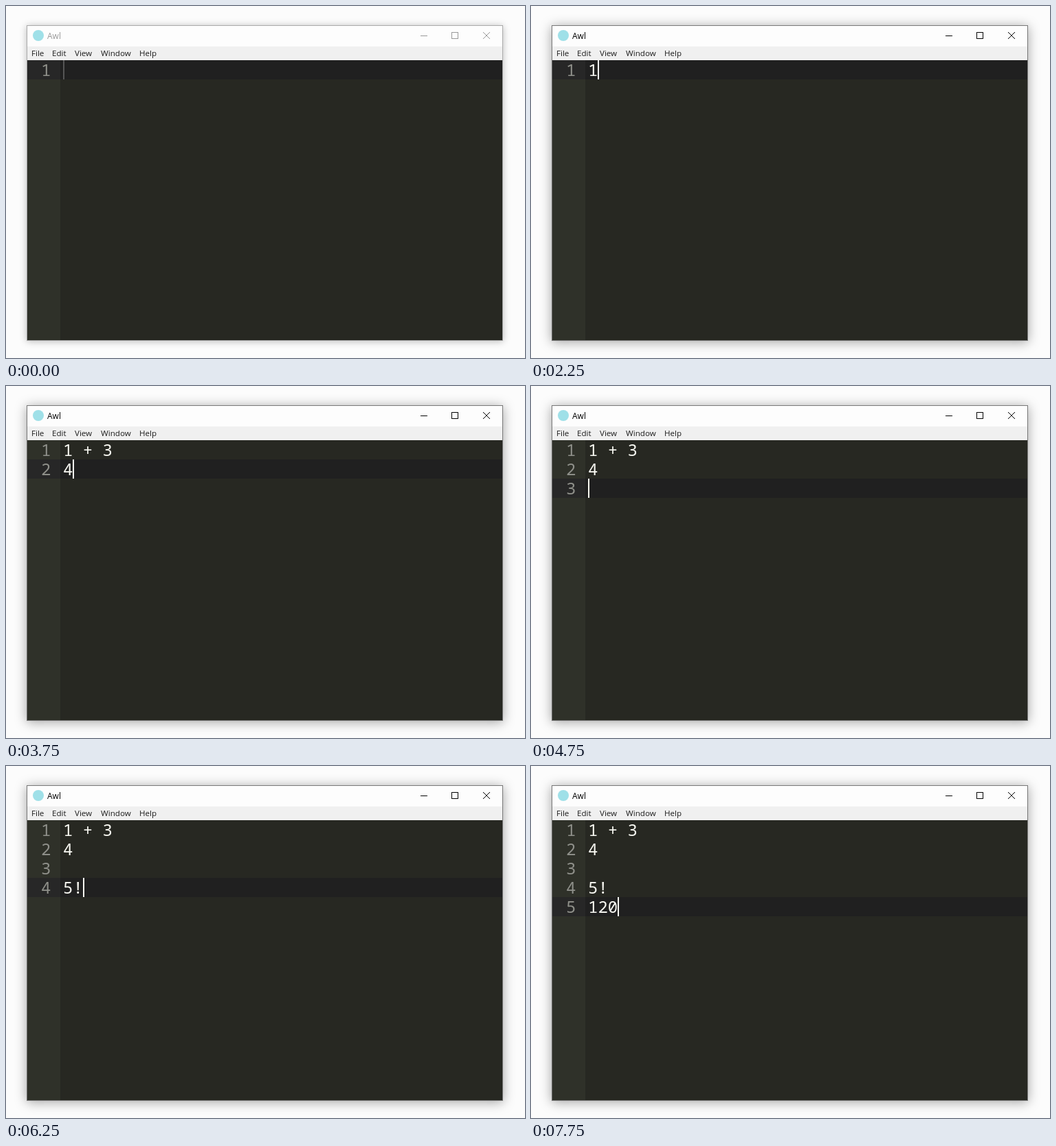
An HTML page with a canvas that plays this animation: 755 px wide and 513 px high, repeating every 8 s.

```html
<!DOCTYPE html>
<html lang="en">
<head>
<meta charset="utf-8">
<title>Calculator editor</title>
<style>
  html, body { margin: 0; width: 100%; height: 100%; overflow: hidden; background: #fcfcfc; }
  canvas { display: block; }
</style>
</head>
<body>
<canvas id="stage" width="755" height="513"></canvas>
<script>
const ctx = document.getElementById('stage').getContext('2d');
const LOOP = 8000;
const FOCUS_AT = 1000;
const WIN = { x: 30, y: 28, w: 693, h: 460 };
const ROW = 28, CELL = 14.4, TOP = 79, TEXT_X = 83, NUMBER_X = 51;
const UI_FONT = '"Open Sans", sans-serif';
const CODE_FONT = '24px "Noto Sans Mono", monospace';

// [start, editor text]
const typing = [
  [0, ''], [2250, '1'], [2500, '1 '], [2750, '1 +'], [3000, '1 + 3'],
  [3750, '1 + 3\n4'], [4750, '1 + 3\n4\n'], [5000, '1 + 3\n4\n\n'],
  [5500, '1 + 3\n4\n\n5'], [6250, '1 + 3\n4\n\n5!'], [6750, '1 + 3\n4\n\n5!\n120']
];
// [start, x, y]; no position means hidden
const pointer = [[0], [500, 178, 409], [750, 173, 203], [1000, 156, 125], [1250, 128, 157], [1500]];
const blinkOff = [1750, 4250, 7500];
const menu = [['File', 37], ['Edit', 67], ['View', 100], ['Window', 138], ['Help', 194]];

const at = (steps, t) => steps.filter(step => step[0] <= t).pop();

function rect(color, x, y, w, h) {
  ctx.fillStyle = color;
  ctx.fillRect(x, y, w, h);
}

function text(str, x, y, font, color) {
  ctx.font = font;
  ctx.fillStyle = color;
  ctx.fillText(str, x, y);
}

function drawFrame(focused) {
  rect('#fcfcfc', 0, 0, 755, 513);
  ctx.save();
  ctx.shadowColor = focused ? 'rgba(0,0,0,.36)' : 'rgba(0,0,0,.26)';
  ctx.shadowBlur = focused ? 16 : 10;
  ctx.shadowOffsetY = focused ? 2 : 1;
  rect(focused ? '#777777' : '#a9a9a9', WIN.x, WIN.y, WIN.w, WIN.h);
  ctx.restore();
  rect('#fdfdfd', 31, 29, 691, 30);
  rect('#f0f0f0', 31, 59, 691, 20);

  ctx.fillStyle = '#9fe0e8';
  ctx.beginPath();
  ctx.arc(47, 43, 8, 0, 7);
  ctx.fill();

  const ink = focused ? '#000000' : '#999999';
  text('Awl', 60, 48, '12px ' + UI_FONT, ink);
  for (const [label, x] of menu) text(label, x, 73, '11.6px ' + UI_FONT, '#1a1a1a');

  rect(ink, 603, 43, 10, 1);
  ctx.strokeStyle = ink;
  ctx.lineWidth = 1;
  ctx.strokeRect(648.5, 38.5, 9, 9);
  ctx.beginPath();
  ctx.moveTo(694, 38);
  ctx.lineTo(704, 48);
  ctx.moveTo(704, 38);
  ctx.lineTo(694, 48);
  ctx.stroke();
}

function drawEditor(t, focused) {
  const lines = at(typing, t)[1].split('\n');
  const last = lines.length - 1;
  const activeY = TOP + last * ROW;

  rect('#272822', 79, TOP, 643, 408);
  rect('#2f3129', 31, TOP, 48, 408);
  rect('#202020', 79, activeY, 643, ROW);
  rect('#272727', 31, activeY, 48, ROW);

  lines.forEach((line, i) => {
    const y = TOP + i * ROW + 23;
    text(i + 1, NUMBER_X, y, CODE_FONT, '#8f908a');
    text(line, TEXT_X, y, CODE_FONT, '#f8f8f2');
  });

  if (blinkOff.some(start => t >= start && t < start + 250)) return;
  const caretX = Math.round(TEXT_X + lines[last].length * CELL);
  rect(focused ? '#f8f8f0' : '#555555', caretX, activeY, 2, ROW);
}

function drawPointer(t) {
  const [, x, y] = at(pointer, t);
  if (x === undefined) return;
  rect('#f4f4f0', x, y - 7, 1, 14);
  for (const edge of [y - 8, y + 7]) {
    rect('#f4f4f0', x - 3, edge, 3, 1);
    rect('#f4f4f0', x + 1, edge, 3, 1);
  }
}

function draw(now) {
  const t = now % LOOP;
  const focused = t >= FOCUS_AT;
  drawFrame(focused);
  drawEditor(t, focused);
  drawPointer(t);
}

const start = performance.now();
function tick() {
  draw(performance.now() - start);
  requestAnimationFrame(tick);
}
tick();
</script>
</body>
</html>
```
